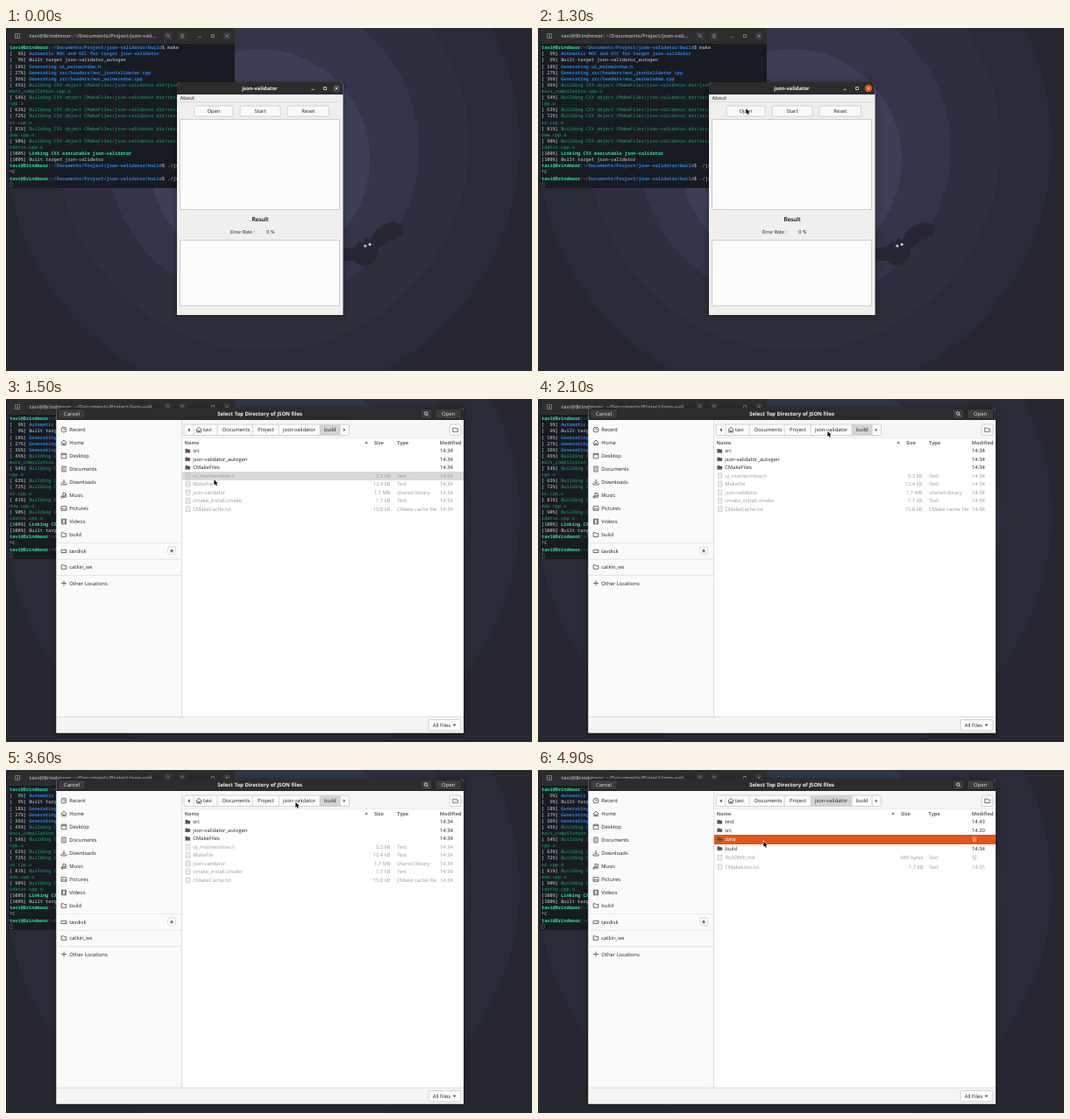
These frames come from a looping animation (600 by 392 pixels, 5000 ms). An HTML page with a canvas:

```html
<!DOCTYPE html>
<html lang="en">
<head>
<meta charset="utf-8">
<title>json-validator</title>
<style>
html, body { margin: 0; width: 100%; height: 100%; overflow: hidden; background: #262731; }
canvas { display: block; }
</style>
</head>
<body>
<canvas id="stage" width="600" height="392"></canvas>
<script>
const c = document.getElementById('stage').getContext('2d');
c.textRendering = 'geometricPrecision';

const LOOP = 5000, STEP = 100;
const FOCUS = 1100, CHOOSER = 1400, GO_UP = 3900, PICK = 4800;
const UI = '"Open Sans", "Noto Sans CJK KR", sans-serif';
const MONO = '"Noto Sans Mono", monospace';
const ORANGE = '#e2541b', INK = '#1f1f1f', FAINT = '#9a9a9a';
const USER = 'tavi', HOST = 'Brindmoor';

function rect(x, y, w, h, fill, stroke, r = 0) {
  c.beginPath();
  c.roundRect(x, y, w, h, r);
  if (fill) { c.fillStyle = fill; c.fill(); }
  if (stroke) { c.strokeStyle = stroke; c.lineWidth = 0.8; c.stroke(); }
}

function disc(x, y, r, fill) {
  c.fillStyle = fill;
  c.beginPath();
  c.arc(x, y, r, 0, 7);
  c.fill();
}

function text(s, x, y, color = INK, { bold, align = 'left', size = 5.85, face = UI } = {}) {
  c.font = `${bold ? 'bold ' : ''}${size}px ${face}`;
  c.textAlign = align;
  c.fillStyle = color;
  c.fillText(s, x, y + size * 0.36);
}

// Path data is relative to the icon's centre.
function icon(d, x, y, color, fill = false, width = 0.8) {
  const p = new Path2D(d);
  c.save();
  c.translate(x, y);
  c.lineWidth = width;
  c.strokeStyle = c.fillStyle = color;
  fill ? c.fill(p) : c.stroke(p);
  c.restore();
}

const ICON = {
  clock: 'M3 0A3 3 0 1 1-3 0A3 3 0 1 1 3 0M0-2V0H1.6',
  home: 'M-3.3 .2L0-3L3.3 .2M-2.2-.4V2.8H-.6V.8H.6V2.8H2.2V-.4',
  desktop: 'M-2.8-2.8H2.8V2.8H-2.8ZM-2.8-1.4H2.8',
  page: 'M-2.2-3H2.2V3H-2.2ZM-1-1H1M-1 1H1',
  down: 'M0-3V1.5M-2-.5L0 1.5L2-.5M-3 1V3H3V1',
  note: 'M-1 2V-2.8L2.3-2V1.4M-1 2A1 .8 0 1 1-2.8 2A1 .8 0 1 1-1 2M2.3 1.4A1 .8 0 1 1 .5 1.4A1 .8 0 1 1 2.3 1.4',
  image: 'M-3-2.3H3V2.3H-3ZM-2.5 1.8L-.8-.3L.5 1L1.5 .2L2.7 1.8',
  film: 'M-2.6-2.8H2.6V2.8H-2.6ZM-1.3-2.8V2.8M1.3-2.8V2.8',
  folder: 'M-2.8 2.3V-2.3H-.5L.2-1.4H2.8V2.3Z',
  disk: 'M-3-1.2H3V2H-3ZM1.2 .5H2',
  plus: 'M0-3V3M-3 0H3',
  search: 'M1.2-.6A1.7 1.7 0 1 1-2.2-.6A1.7 1.7 0 1 1 1.2-.6M.7 .7L2.4 2.4',
  menu: 'M-2-1.8H2M-2 0H2M-2 1.8H2',
  min: 'M-1.6 1.3H1.6',
  max: 'M-1.5-1.5H1.5V1.5H-1.5Z',
  close: 'M-1.5-1.5L1.5 1.5M1.5-1.5L-1.5 1.5',
  left: 'M1.2-2L-1.2 0L1.2 2Z',
  right: 'M-1.2-2L1.2 0L-1.2 2Z',
  up: 'M-2 1.2L0-1.2L2 1.2Z',
  drop: 'M-2-1L0 1.2L2-1Z',
  eject: 'M-1.9 .7L0-1.7L1.9 .7ZM-1.9 1.3H1.9V2H-1.9Z',
  pointer: 'M0 0V6.2L1.4 5L2.4 7.2L3.5 6.8L2.6 4.6H4.5Z'
};

function wallpaper() {
  c.fillStyle = '#262731';
  c.fillRect(0, 0, 600, 392);
  disc(293, 133, 293, '#292b38');
  disc(293, 133, 235, '#2d2f3e');
  disc(293, 138, 178, '#333549');
  disc(289, 150, 126, '#3d3f57');
  icon('M385 252L398 250L404 243L407 246L411 240L416 242Q420 227 440 222Q449 222 453 227L451 239'
    + 'L446 236L442 243L437 241Q433 249 425 252Q426 263 415 271L405 272L398 266L385 266Z', 0, 0, '#262732', true);
  disc(409.8, 249, 1.6, '#b9cbd6');
  disc(415, 247.3, 1.6, '#b9cbd6');
}

const prompt = [[`${USER}@${HOST}`, '#2ee5a4', 1], [':', '#ddd'],
  ['~/Documents/Project/json-validator/build', '#2f86e4', 1]];
const step = (pct, s, color, bold) => [[`[${String(pct).padStart(3)}%] `, '#d5d7d9'], [s, color, bold]];
const blue = (pct, s) => step(pct, s, '#2f7fe0', 1);
const build = (pct, s = 'src/') => step(pct, 'Building CXX object CMakeFiles/json-validator.dir/' + s, '#25a577');
const wrapped = s => [[s, '#25a577']];
const log = [
  [...prompt, ['$ make', '#ddd']],
  blue(9, 'Automatic MOC and UIC for target json-validator'),
  step(9, 'Built target json-validator_autogen', '#d5d7d9'),
  blue(18, 'Generating ui_mainwindow.h'),
  blue(27, 'Generating src/headers/moc_jsonValidator.cpp'),
  blue(36, 'Generating src/headers/moc_mainwindow.cpp'),
  build(45, 'json-validator_autogen/'), wrapped('mocs_compilation.cpp.o'),
  build(54), wrapped('cpp.o'),
  build(63),
  build(72), wrapped('or.cpp.o'),
  build(81), wrapped('dow.cpp.o'),
  build(90), wrapped('idator.cpp.o'),
  step(100, 'Linking CXX executable json-validator', '#2ee5a4', 1),
  step(100, 'Built target json-validator', '#d5d7d9'),
  [...prompt, ['$ ./json-validator', '#ddd']],
  [['^C', '#ddd']],
  [...prompt, ['$ ./json-validator', '#ddd']]
];

function terminal() {
  rect(3, 0, 258, 183, '#181c22');
  rect(3, 0, 258, 18, '#2d2d2d');
  const grey = '#8f8f8f';
  icon('M-2.5-2.5H2.5V2.5H-2.5ZM0-1V1.5M-1.2 .3H1.2', 13, 9, grey);
  text(`${USER}@${HOST}: ~/Documents/Project/json-vali...`, 99, 9, '#9c9c9c', { bold: true, align: 'center' });
  rect(179, 3, 12, 12, '#343434', '#262626', 2);
  rect(195, 3, 12, 12, '#343434', '#262626', 2);
  icon(ICON.search, 185, 9, grey);
  icon(ICON.menu, 201, 9, grey);
  windowButtons(221, 236, 252, 9, grey, '#3d3d3d');
  log.forEach((parts, row) => {
    let x = 4;
    for (const [s, color, bold] of parts) {
      text(s, x, 22.3 + row * 7.11, color, { bold, size: 5.27, face: MONO });
      x += s.length * 3.162;
    }
  });
  rect(4.5, 176, 2.6, 5.5, null, '#50545a');
}

function windowButtons(min, max, close, y, color, closeFill) {
  icon(ICON.min, min, y, color);
  icon(ICON.max, max, y, color);
  disc(close, y, 4.2, closeFill);
  icon(ICON.close, close, y, color);
}

function shadowed(blur, draw) {
  c.save();
  c.shadowColor = 'rgba(0,0,0,.4)';
  c.shadowBlur = blur;
  c.shadowOffsetY = 1;
  draw();
  c.restore();
}

function validator(focused) {
  shadowed(focused ? 9 : 6, () => rect(195, 62, 189.5, 266, '#f0efee', null, [4, 4, 0, 0]));
  rect(195, 62, 189.5, 14, '#2d2c2c', null, [4, 4, 0, 0]);
  text('json-validator', 289.5, 69, '#f2f2f2', { bold: true, align: 'center' });
  windowButtons(350, 364, 377, 69, '#e0e0e0', focused ? ORANGE : '#4a4a4a');
  text('About', 198.5, 80.3);
  rect(195, 84.2, 189.5, 0.7, '#dad9d8');
  [['Open', 215, 44], ['Start', 267, 46], ['Reset', 321, 47.5]].forEach(([s, x, w]) => {
    rect(x, 89, w, 12, '#fafafa', '#c9c6c3', 1.5);
    text(s, x + w / 2, 95, INK, { align: 'center' });
  });
  rect(198.5, 104.5, 182, 103, '#fdfcfd', '#c5c2c0');
  const label = '"Lato", sans-serif';
  text('Result', 290, 219, '#111', { bold: true, align: 'center', size: 6.8, face: label });
  text('Error Rate :', 256, 232.5, '#222', { size: 5.6, face: label });
  text('0 %', 297, 232.5, '#222', { size: 5.6, face: label });
  rect(198.5, 242.5, 182, 75, '#fdfcfd', '#c5c2c0');
}

const places = [
  ['Recent', 35, 'clock'], ['Home', 50, 'home'], ['Desktop', 65, 'desktop'], ['Documents', 80, 'page'],
  ['Downloads', 95, 'down'], ['Music', 110, 'note'], ['Pictures', 125, 'image'], ['Videos', 140, 'film'],
  ['build', 155, 'folder'], ['tavdisk', 173.5, 'disk'], ['catkin_ws', 192, 'folder'], ['Other Locations', 210.5, 'plus']
];
const crumbs = [[USER, 214, 225], ['Documents', 241, 247], ['Project', 281, 287],
  ['json-validator', 311, 316], ['build', 358, 363], ['', 381]];

// Rows: name, modified, size, type. Rows without a size are folders.
const buildDir = {
  arrow: 411, size: 420, sizeEnd: 438.5, type: 446, crumb: 4,
  rows: [
    ['src', '14:34'], ['json-validator_autogen', '14:34'], ['CMakeFiles', '14:34'],
    ['ui_mainwindow.h', '14:34', '5.3 kB', 'Text'], ['Makefile', '14:34', '12.4 kB', 'Text'],
    ['json-validator', '14:34', '1.7 MB', 'shared library'], ['cmake_install.cmake', '14:34', '1.7 kB', 'Text'],
    ['CMakeCache.txt', '14:34', '15.8 kB', 'CMake cache file']
  ]
};
const projectDir = {
  arrow: 405, size: 414, sizeEnd: 439.5, type: 445.5, crumb: 3,
  rows: [
    ['test', '14:43'], ['src', '14:20'], ['data', '일'], ['build', '14:34'],
    ['README.md', '일', '685 bytes', 'Text'], ['CMakeLists.txt', '14:25', '1.7 kB', 'Text']
  ]
};

function fileList(dir, selected, [px, py]) {
  const head = (s, x, align) => text(s, x, 50, '#666', { bold: true, align, size: 5.6 });
  head('Name', 203.5);
  head('Size', dir.size);
  head('Type', dir.type);
  head('Modified', 519.5, 'right');
  icon(ICON.up, dir.arrow, 49.5, '#777', true);
  let top = 54.5;
  dir.rows.forEach(([name, time, size, type], i) => {
    const height = time === '일' ? 11.5 : 9.5; // Hangul makes its row taller
    const y = top + height / 2;
    const picked = i === selected, hovered = px > 201 && py >= top && py < top + height;
    if (picked || hovered) {
      const edge = Math.round(top);
      rect(201, edge, 321, Math.round(top + height) - edge, picked ? ORANGE : '#d9d9d9');
    }
    const color = picked ? '#fff' : size ? FAINT : INK;
    if (size) {
      icon(ICON.page, 207.5, y, '#adadad', false, 0.6);
      text(size, dir.sizeEnd, y, FAINT, { align: 'right' });
      text(type, dir.type, y, FAINT);
    } else {
      icon(ICON.folder, 207.3, y, '#55504e', true);
      icon('M-2.8 1.8H2.8', 207.3, y, '#a0705c');
    }
    text(name, 213.3, y, color);
    text(time, 495, y, color);
    top += height;
  });
}

function chooser(dir, selected, pointer) {
  shadowed(6, () => rect(57.5, 10, 464.5, 371.5, '#fff', null, [4, 4, 0, 0]));
  rect(57.5, 10, 464.5, 14, '#2d2c2c', null, [4, 4, 0, 0]);
  const dark = (x, w) => rect(x, 11.5, w, 11, '#3d3c3c', '#1e1e1e', 2);
  dark(59.5, 31);
  dark(473, 13);
  dark(489.5, 30);
  text('Cancel', 75, 17.1, '#eee', { align: 'center' });
  text('Open', 504.5, 17.1, '#eee', { align: 'center' });
  text('Select Top Directory of JSON files', 289.5, 17.1, '#f4f4f4', { bold: true, align: 'center', size: 5.95 });
  icon(ICON.search, 479.5, 17.1, '#eee');

  rect(57.5, 24, 143, 339, '#fafafa');
  rect(200.2, 24, 0.7, 339, '#d3d0ce');
  for (const y of [164.2, 182.8, 201.3]) rect(57.5, y, 143, 0.6, '#dddbd9');
  for (const [name, y, shape] of places) {
    icon(ICON[shape], 66, y, '#4a4a4a');
    text(name, 72.3, y);
  }
  rect(184.5, 168.8, 9, 9, '#fdfdfd', '#d8d5d3', 2);
  icon(ICON.eject, 189, 173.3, '#555', true);

  rect(201, 24, 321, 20, '#f7f6f5');
  rect(201, 44, 321, 0.6, '#dcdad8');
  rect(203, 29, 188.5, 12.5, '#fbfbfa', '#cbc8c5', 2);
  crumbs.forEach(([name, x, tx], i) => {
    if (i === dir.crumb) rect(x, 29.3, crumbs[i + 1][1] - x, 11.9, '#d6d3d1');
    rect(x - 0.3, 29, 0.7, 12.5, '#cbc8c5');
    text(name, tx, 35.3);
  });
  icon(ICON.left, 208.5, 35.3, '#444', true);
  icon(ICON.right, 386, 35.3, '#666', true);
  icon(ICON.home, 220, 35.3, '#444');
  rect(506, 29, 13, 12.5, '#fbfbfa', '#cbc8c5', 2);
  icon(ICON.folder, 512.5, 35.3, '#555');

  fileList(dir, selected, pointer);

  rect(57.5, 363, 464.5, 18.5, '#f6f5f4');
  rect(57.5, 362.7, 464.5, 0.7, '#d3d0ce');
  rect(482, 366.5, 37, 12.5, '#fbfbfa', '#cbc8c5', 2);
  text('All Files', 486.8, 372.7);
  icon(ICON.drop, 511.5, 372.7, '#444', true);
}

// Pointer stops: time, x, y.
const stops = [[100, 599, 270], [600, 408, 190], [1100, 238, 94], [1300, 237.3, 92], [1600, 237.3, 92],
  [2100, 330.3, 36.7], [3900, 330.3, 36.7], [4500, 287.6, 64.2], [4800, 257.3, 81.5], [5000, 257.3, 81.5]];

function pointerAt(t) {
  const i = stops.findIndex(s => s[0] > t);
  if (i < 1) return null;
  const [t0, x0, y0] = stops[i - 1], [t1, x1, y1] = stops[i];
  const u = (t - t0) / (t1 - t0), k = u * u * (3 - 2 * u);
  return [x0 + (x1 - x0) * k, y0 + (y1 - y0) * k];
}

function draw(now) {
  const t = Math.floor(now % LOOP / STEP) * STEP;
  const pointer = pointerAt(t);
  wallpaper();
  terminal();
  if (t < CHOOSER) validator(t >= FOCUS);
  else if (t < GO_UP) chooser(buildDir, -1, pointer);
  else chooser(projectDir, t < PICK ? 3 : 2, pointer);
  if (pointer) {
    icon(ICON.pointer, ...pointer, '#fff', false, 1.2);
    icon(ICON.pointer, ...pointer, '#111', true);
  }
  requestAnimationFrame(animate);
}

const start = performance.now();
function animate() { draw(performance.now() - start); }
animate();
</script>
</body>
</html>
```
